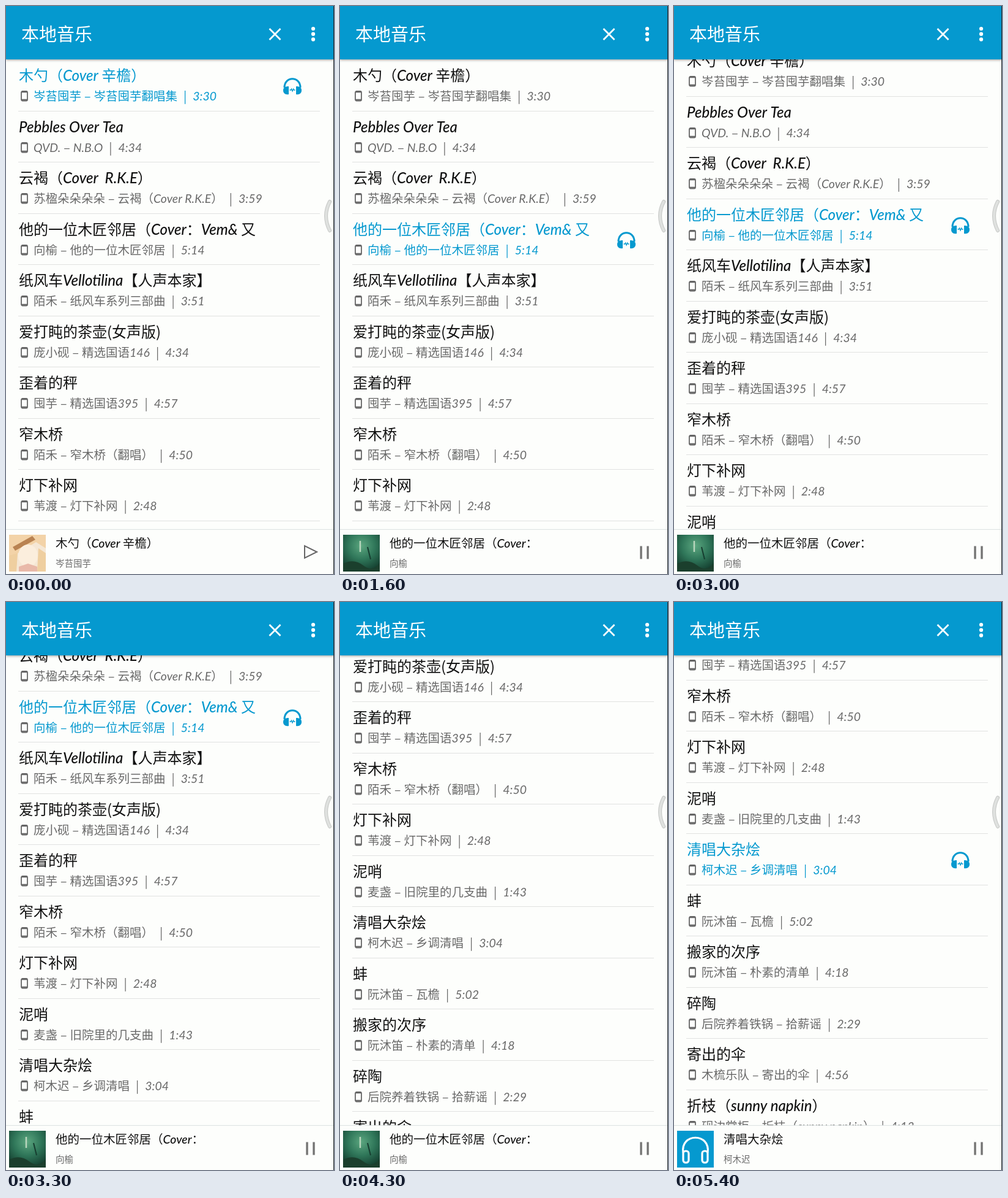
An HTML page for the animation above (7900 ms loop, 536 px wide and 926 px high).

```html
<!DOCTYPE html>
<html lang="zh-CN">
<head>
<meta charset="utf-8">
<title>本地音乐</title>
<style>
  :root { --blue: #0599cf; --ink: #111; --gray: #696969; }
  html, body { margin: 0; width: 100%; height: 100%; overflow: hidden; background: #fdfefc; }
  body { font-family: "Noto Sans CJK SC", "Noto Sans CJK JP", "Noto Sans CJK", sans-serif; }
  #stage { position: absolute; left: 0; top: 0; width: 536px; height: 926px; overflow: hidden; }
  #stage div, svg { position: absolute; }
  .text { white-space: pre; line-height: 34px; }
  i { font-family: Lato, sans-serif; font-style: italic; line-height: 0; }
  .dash { padding: 0 5px; }
  .bar { padding: 0 10px; }

  #header { left: 0; top: 0; width: 536px; height: 87px; background: var(--blue); box-shadow: 0 1px 4px #0006; }
  #header .text { left: 25px; top: 27px; font-size: 29px; font-weight: 500; color: #fff; }
  #header svg { left: 0; top: 0; }

  #view { left: 0; top: 87px; width: 536px; height: 767px; overflow: hidden; }
  #list { left: 0; top: 1px; animation: scroll 7.9s step-end infinite; }
  .row { --title: var(--ink); --sub: var(--gray); --on: 0;
    left: 20px; width: 493px; height: 82.5px; border-bottom: 1px solid #e1e2e1; }
  .title { left: 1px; top: 7px; font-size: 24px; font-weight: 500; color: var(--title); }
  .sub { left: 25px; top: 41px; font-size: 19.5px; color: var(--sub); }
  .phone { left: 3px; top: 49px; }
  .phones { left: 432px; top: 28px; opacity: var(--on); color: var(--blue); }
  .row:nth-child(1) { animation: first 7.9s step-end infinite; }
  .row:nth-child(4) { animation: second 7.9s step-end infinite; }
  .row:nth-child(11) { animation: third 7.9s step-end infinite; }

  #player { left: 0; top: 854px; width: 536px; height: 72px; background: #fdfefc; box-shadow: 0 -1px 1px #dfe5e4; }
  .track { left: 0; top: 0; width: 536px; height: 72px; opacity: 0; }
  .track svg { left: 5px; top: 8px; }
  .track .button { left: 484px; top: 22px; }
  .name { left: 81px; top: 4px; font-size: 19.5px; color: var(--ink); font-weight: 500; }
  .artist { left: 81px; top: 37px; font-size: 14.5px; color: var(--gray); }
  .track:nth-child(1) { animation: play1 7.9s step-end infinite; }
  .track:nth-child(2) { animation: play2 7.9s step-end infinite; }
  .track:nth-child(3) { animation: play3 7.9s step-end infinite; }

  #edge { right: 0; top: 0; width: 1px; height: 926px; background: #1c2326; }
  #handle { left: 516px; top: 312px; }

  @keyframes first {
    0% { --title: var(--blue); --sub: var(--blue); --on: 1; }
    8.86%, to { --title: var(--ink); --sub: var(--gray); --on: 0; }
  }
  @keyframes second {
    0%, 64.556%, to { --title: var(--ink); --sub: var(--gray); --on: 0; }
    8.86% { --title: var(--blue); --sub: var(--blue); --on: 1; }
  }
  @keyframes third {
    0% { --title: var(--ink); --sub: var(--gray); --on: 0; }
    64.556%, to { --title: var(--blue); --sub: var(--blue); --on: 1; }
  }
  @keyframes play1 { 0% { opacity: 1; } 12.658%, to { opacity: 0; } }
  @keyframes play2 { 0%, 68.354%, to { opacity: 0; } 12.658% { opacity: 1; } }
  @keyframes play3 { 0% { opacity: 0; } 68.354%, to { opacity: 1; } }

  /* three flicks, each one slowing down */
  @keyframes scroll {
    0% { transform: none; }
    37.974% { transform: translateY(-24px); }
    39.24% { transform: translateY(-88px); }
    40.506% { transform: translateY(-148px); }
    41.772% { transform: translateY(-193px); }
    43.037% { transform: translateY(-224px); }
    44.303% { transform: translateY(-238px); }
    46.835% { transform: translateY(-300px); }
    48.101% { transform: translateY(-367px); }
    49.367% { transform: translateY(-394px); }
    50.632% { transform: translateY(-402px); }
    54.43% { transform: translateY(-426px); }
    55.696% { transform: translateY(-474px); }
    56.962% { transform: translateY(-512px); }
    58.227% { transform: translateY(-536px); }
    59.493%, to { transform: translateY(-545px); }
  }
</style>
</head>
<body>
<div id="stage">
  <div id="view"><div id="list"></div></div>
  <div id="header">
    <div class="text">本地音乐</div>
    <svg width="536" height="87" fill="#fff">
      <path d="M430.5 37L448.5 55M448.5 37L430.5 55" stroke="#fff" stroke-width="2.8"/>
      <circle cx="502" cy="37" r="3.1"/><circle cx="502" cy="45.7" r="3.1"/><circle cx="502" cy="54.4" r="3.1"/>
    </svg>
  </div>
  <div id="player"></div>
  <svg id="handle" width="20" height="60" fill="none" stroke-linecap="round">
    <path d="M13 7Q1 30 13 54" stroke="#c6c8c6" stroke-width="6"/>
    <path d="M13 7Q1 30 13 54" stroke="#dfe1df" stroke-width="4"/>
  </svg>
  <div id="edge"></div>
</div>
<script>
  // title, artist, album, duration
  const songs = [
    ['木勺（Cover 辛檐）', '岑苔囤芋', '岑苔囤芋翻唱集', '3:30'],
    ['Pebbles Over Tea', 'QVD.', 'N.B.O', '4:34'],
    ['云褐（Cover  R.K.E）', '苏楹朵朵朵朵', '云褐（Cover R.K.E）', '3:59'],
    ['他的一位木匠邻居（Cover：Vem& 又', '向榆', '他的一位木匠邻居', '5:14'],
    ['纸风车Vellotilina【人声本家】', '陌禾', '纸风车系列三部曲', '3:51'],
    ['爱打盹的茶壶(女声版)', '庞小砚', '精选国语146', '4:34'],
    ['歪着的秤', '囤芋', '精选国语395', '4:57'],
    ['窄木桥', '陌禾', '窄木桥（翻唱）', '4:50'],
    ['灯下补网', '苇渡', '灯下补网', '2:48'],
    ['泥哨', '麦盏', '旧院里的几支曲', '1:43'],
    ['清唱大杂烩', '柯木迟', '乡调清唱', '3:04'],
    ['蚌', '阮沐笛', '瓦檐', '5:02'],
    ['搬家的次序', '阮沐笛', '朴素的清单', '4:18'],
    ['碎陶', '后院养着铁锅', '拾薪谣', '2:29'],
    ['寄出的伞', '木梳乐队', '寄出的伞', '4:56'],
    ['折枝（sunny napkin）', '砚边掌柜', '折枝（sunny napkin）', '4:13']
  ];

  const phone = `<svg class="phone" width="15" height="20" fill="none" stroke="#666">
    <rect x="2" y="2" width="10" height="15.5" rx="2" stroke-width="1.8"/>
    <path d="M2 3.3H12M2 15.8H12" stroke-width="2"/></svg>`;

  const phones = `<svg class="phones" width="32" height="30" fill="none" stroke="currentColor">
    <path d="M3 17C3 -2 29 -2 29 17" stroke-width="3"/>
    <path d="M10 15V28C4 29 1 26 1 21.500S4 15 10 15ZM22 15V28C28 29 31 26 31 21.500S28 15 22 15Z" fill="currentColor" stroke="none"/>
    <path d="M11.500 21H13.500L14.500 19 16 23 17.500 19 18.500 21H20.500" stroke-width="1.3"/></svg>`;

  const playButton = '<path d="M4 4V24L24 14Z" fill="none" stroke="#666" stroke-width="2"/>';
  const pauseButton = '<path d="M8 4.500V25.500M19 4.500V25.500" stroke="#747474" stroke-width="3.4"/>';

  const paleCover = `
    <rect width="60" height="60" fill="#f5e7d5"/>
    <path d="M0 0H60V22L44 12 8 34 0 60Z" fill="#f3d3a8"/>
    <path d="M6 20L38 2 43 8 10 26Z" fill="#b98352"/>
    <ellipse cx="31" cy="34" rx="16" ry="18" fill="#fbeedd"/>
    <path d="M0 34L14 30 12 60H0ZM48 22L60 30V60H46Z" fill="#efcfa0"/>
    <path d="M16 52L31 47 46 52V60H16Z" fill="#e9b9a9"/>`;
  const greenCover = `
    <defs><radialGradient id="mist" cx=".5" cy=".3" r=".75">
      <stop stop-color="#5ba67f"/><stop offset=".5" stop-color="#2f7659"/><stop offset="1" stop-color="#123a2c"/>
    </radialGradient></defs>
    <rect width="60" height="60" fill="url(#mist)"/>
    <path d="M0 47Q18 38 33 50T60 46V60H0Z" fill="#1b3f2d"/>
    <path d="M28 10V28" stroke="#b9d6bd" stroke-width="2.5"/>
    <path d="M40 20L45 40" stroke="#173f30" stroke-width="2"/>`;
  const blueCover = `
    <rect width="60" height="60" fill="#0599cf"/>
    <g fill="none" stroke="#fff" stroke-width="3.2">
      <path d="M10 36C5 3 55 3 50 36"/>
      <rect x="10" y="33" width="9" height="19" rx="4"/><rect x="41" y="33" width="9" height="19" rx="4"/>
    </g>`;

  const latin = text => text.replace(/[\w.:&]+/g, '<i>$&</i>');
  const line = (kind, html) => `<div class="text ${kind}">${html}</div>`;

  const row = ([title, artist, album, time], i) => `<div class="row" style="top:${i * 83.5}px">
    ${line('title', latin(title))}${phone}
    ${line('sub', `${latin(artist)}<span class="dash">–</span>${latin(album)}<span class="bar">|</span>${latin(time)}`)}
    ${phones}</div>`;

  const track = ([title, artist], cover, button) => `<div class="track">
    <svg width="60" height="60">${cover}</svg>
    ${line('name', latin(title.replace(/：.*/, '：')))}${line('artist', artist)}
    <svg class="button" width="28" height="30">${button}</svg></div>`;

  document.getElementById('list').innerHTML = songs.map(row).join('');
  document.getElementById('player').innerHTML =
    track(songs[0], paleCover, playButton) +
    track(songs[3], greenCover, pauseButton) +
    track(songs[10], blueCover, pauseButton);
</script>
</body>
</html>
```
